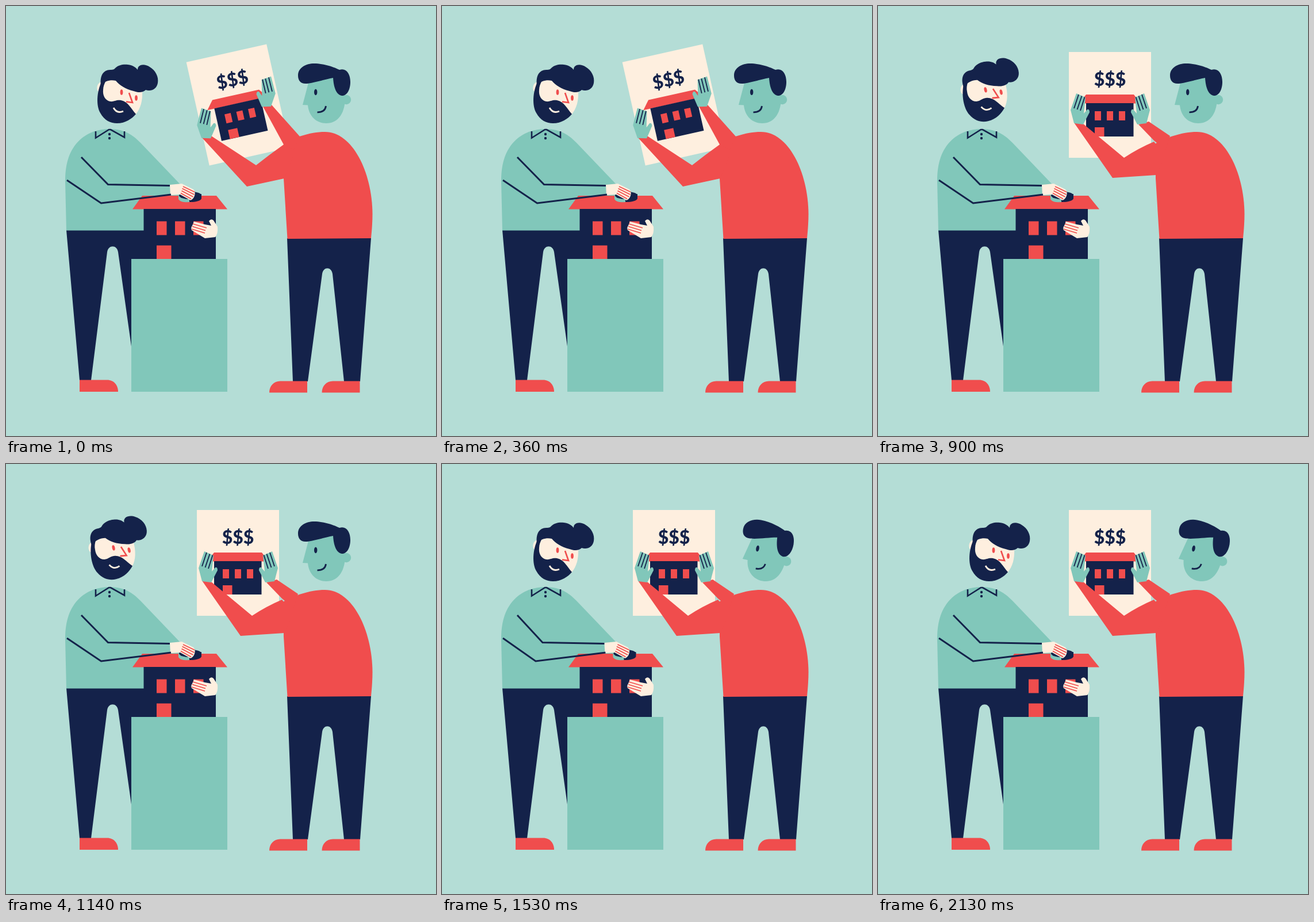
These frames come from a looping animation (748 by 748 pixels, 2460 ms). An HTML page with a canvas:

```html
<!DOCTYPE html>
<html lang="en">
<head>
<meta charset="utf-8">
<title>House sale</title>
<style>
html, body { margin: 0; width: 100%; height: 100%; overflow: hidden; background: #b4ddd6; }
canvas { display: block; width: 748px; height: 748px; }
</style>
</head>
<body>
<canvas id="stage" width="748" height="748"></canvas>
<script>
const ctx = document.getElementById('stage').getContext('2d');
const BG = '#b4ddd6', TEAL = '#81c7ba', NAVY = '#14224a', RED = '#f04d4d', CREAM = '#feefdf';
const LOOP = 2460;

const fill = (color, d) => { ctx.fillStyle = color; ctx.fill(new Path2D(d)); };
const line = (color, width, d) => {
  ctx.strokeStyle = color;
  ctx.lineWidth = width;
  ctx.stroke(new Path2D(d));
};
const rect = (color, x, y, w, h) => { ctx.fillStyle = color; ctx.fillRect(x, y, w, h); };
const oval = (color, x, y, rx, ry = rx, turn = 0) => {
  ctx.fillStyle = color;
  ctx.beginPath();
  ctx.ellipse(x, y, rx, ry, turn, 0, Math.PI * 2);
  ctx.fill();
};
const mix = (a, b, k) => a + (b - a) * k;
const wave = k => (1 - Math.cos(k * Math.PI)) / 2;
const ease = (t, from, to) => wave(Math.min(1, Math.max(0, (t - from) / (to - from))));

function turned(x, y, deg, draw) {
  ctx.save();
  ctx.translate(x, y);
  ctx.rotate(deg * Math.PI / 180);
  ctx.translate(-x, -y);
  draw();
  ctx.restore();
}

// How far the polishing arm is to the left, 0 to 1
function armShift(t) {
  if (t < 360) return wave(2 * Math.max(0, t - 30) / 330);
  if (t < 1350) return ease(t, 1140, 1350);
  if (t < 1650) return wave(1 + 2 * (t - 1350) / 300);
  if (t < 1710) return 1;
  if (t < 2130) return wave(1 + 3 * (t - 1710) / 420);
  return 0;
}

function ownerBody() {
  fill(NAVY, 'M105 390H242V650H226L218 592L195 428C193 415 178 415 176 428L148 651H128Z');
  fill(RED, 'M128 650.5H176C188 650.5 195 660 195 671H128Z');
  fill(TEAL, 'M105 390.5L103 305C102 240 140 214 180 214C206 214 220 224 234 238L322 330L240 390.5Z');
  line(NAVY, 2.6, 'M156 218V229.5L179 215H182L206 228.5V218');
  oval(NAVY, 180, 223, 2.2);
  oval(NAVY, 180, 230, 2.2);
}

function ownerHead() {
  oval(CREAM, 165, 141, 6.5, 9, 0.3);
  fill(CREAM, 'M168 126C162 150 164 175 176 190L205 201L226 188C234 178 238 165 237 146L200 118Z');
  fill(NAVY, 'M167 130C157 150 157 174 164 186C171 199 182 204 193 204C208 204 219 196 226 188C217 178 212 166 200 164C191 163 188 167 181 166C172 164 168 155 169 146C169 140 171 135 174 130Z');
  fill(NAVY, 'M165 137C163 122 169 110 183 111C186 111 189 110 190 108C196 102 205 101 212 102C221 103 226 107 229 111C229 101 241 100 250 106C260 112 266 123 264 134C262 145 252 149 243 146C238 151 230 151 222 148C207 144 198 138 191 130C183 128 172 130 165 137Z');
  oval(RED, 201, 150, 2.4, 4.7);
  oval(RED, 226.5, 160, 2.4, 4.7);
  line(RED, 2.6, 'M214 151L220 168L209 166.5');
  line(CREAM, 2.8, 'M187 177Q193 188 204 183');
}

function model() {
  fill(RED, 'M237 330H366L385 353.5H220Z');
  rect(NAVY, 239.5, 353, 125.5, 87);
  for (const x of [262, 294, 326]) rect(RED, x, 374.5, 17.5, 24);
  rect(RED, 262, 416.5, 25.5, 23.5);
  rect(TEAL, 218, 440, 167, 231);
  fill(CREAM, 'M327 375L346 380L357 382L353 374Q357 369 361 373L368 384Q369 396 364 402L346 404L323 390Q321 386 324 382Z');
  line(RED, 1.7, 'M325 379L349 386M324 383.5L347 390.5M323 388L346 395');
}

function ownerArm(shift) {
  const dx = -25.4 * shift, X = x => x + dx;
  ctx.save();
  ctx.translate(dx, 0);
  fill(NAVY, 'M301 329V335C304 343 337 343 340 335V327Z');
  fill(TEAL, 'M300 329V336C303 341 312 342 319 341V329Z');
  oval(NAVY, 320.5, 329.5, 19.5, 6.8);
  fill(CREAM, 'M285 311L306 309L326 319Q330 323 328 330Q326 336 321 338L303 328L286 329Z');
  line(RED, 1.8, 'M308 314L328 323.5M306.5 317.5L327.5 328M305.5 321.5L325.5 332M304 325.5L322 335.5');
  ctx.restore();
  line(NAVY, 3, `M131 263L${X(177.5)} 310.5L${X(285)} 312.5M106 303L${X(165.5)} 343L${X(287)} 328`);
}

function paper() {
  rect(CREAM, 332, 80, 143, 184);
  ctx.fillStyle = NAVY;
  ctx.font = '800 32px Lato, "Open Sans", sans-serif';
  ctx.textAlign = 'center';
  ctx.fillText('$$$', 403.5, 138.5);
  fill(RED, 'M362 154H445L457 169.5H349.5Z');
  rect(NAVY, 362, 169, 82.5, 58);
  for (const x of [377, 398, 419]) rect(RED, x, 183, 11, 16);
  rect(RED, 377, 211, 16.5, 16);
}

function hand() {
  fill(TEAL, 'M341 204L335 181L345 152L361 159L358 187L364 180Q368 179 368 185L357 206Z');
  line(NAVY, 1.8, 'M349 154L341 178M354.5 156.5L346.5 180M359.5 158.5L352 182');
}

function sellerArms(tilt) {
  const P = (x0, y0, x1, y1) => `${mix(x0, x1, tilt)} ${mix(y0, y1, tilt)}`;
  fill(RED, `M${P(341, 203, 340, 228)}L${P(408, 299, 419, 314)}L${P(484, 294, 484, 300)}L500 260` +
    `L${P(480, 236, 483, 241)}Q${P(452, 248, 459, 258)} ${P(428, 264, 435, 277)}L${P(357, 205, 357, 226)}Z`);
  fill(RED, `M${P(453, 206, 446, 173)}L${P(471, 201, 462, 172)}L${P(508, 226, 512, 228)}L500 250L${P(480, 234, 483, 241)}Z`);

  ctx.save();
  ctx.translate(-tilt, 25 * tilt);
  turned(349, 204, -4.5 * tilt, hand);
  ctx.restore();

  ctx.save();
  ctx.translate(-6 * tilt, -30 * tilt);
  turned(459, 204, 4.5 * tilt, () => {
    ctx.translate(808, 0);
    ctx.scale(-1, 1);
    hand();
  });
  ctx.restore();
}

function sellerBody() {
  fill(NAVY, 'M489 404H635L616 653H588L568 466C566 453 552 453 550 466L525 653H499Z');
  for (const x of [458, 549.5]) fill(RED, `M${x} 672.5C${x} 661 ${x + 8} 652.5 ${x + 19} 652.5H${x + 66}V672.5Z`);
  fill(RED, 'M489.5 405L483 300V239L510 227C530 221 540 219 555 219C602 219 637 288 637.5 362Q637.5 380 635 404Z');
}

function sellerHead(open) {
  oval(TEAL, 592, 163, 8.2);
  fill(TEAL, 'M527 130L516 172L525 172.5C527 192 540 204 557 204C578 204 591 186 590 155L578 118Z');
  fill(NAVY, 'M508 121C508 107 522 100 536 100C554 100 572 107 580 111C592 107 599 118 599 132C599 147 592 157 584 156C574 154 570 141 569 125C556 127 533 135 521 135C512 135 508 129 508 121Z');
  oval(NAVY, 538.7, 149.8, 2.7, 5.4 * open);
  line(NAVY, 2.8, 'M541.5 184.8Q555 185 556.5 174');
}

function draw(t) {
  const tilt = 1 - ease(t, 600, 900);
  const nod = ease(t, 1140, 1350);
  const look = ease(t, 600, 900) - nod;
  const blink = t > 360 && t < 510 ? Math.sin((t - 360) / 150 * Math.PI) : 0;

  rect(BG, 0, 0, 748, 748);
  ownerBody();
  turned(176, 209, -13 * look, ownerHead);
  model();
  ownerArm(armShift(t));

  turned(403.5, 172, -12.6 * tilt, paper);
  sellerBody();
  sellerArms(tilt);
  turned(560, 207.5, 10 * nod, () => sellerHead(1 - 0.9 * blink));
}

const start = performance.now();
function tick() {
  draw((performance.now() - start) % LOOP);
  requestAnimationFrame(tick);
}
tick();
</script>
</body>
</html>
```
